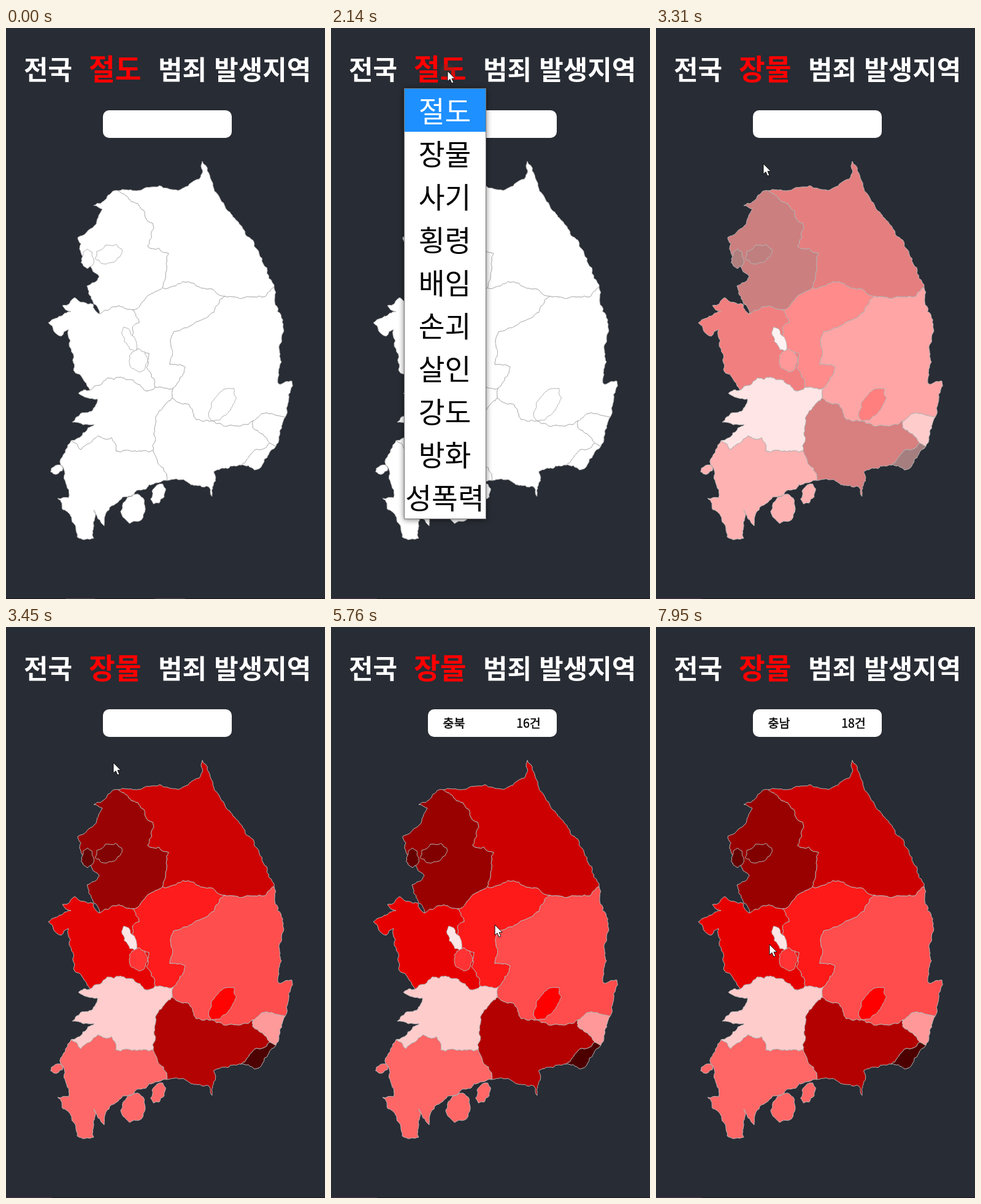
Animation, 520 px wide and 930 px high, one loop 8000 ms. Source, as an HTML page:

```html
<!DOCTYPE html>
<html lang="ko">
<meta charset="utf-8">
<style>
  html, body { margin: 0; height: 100%; overflow: hidden; background: #282c34; }
  svg { display: block; width: 520px; height: 930px; font-family: "Noto Sans CJK KR", "Noto Sans CJK", "Noto Sans CJK JP", sans-serif; }
  .title { font-weight: 700; font-size: 43px; fill: #fff; }
  .info { font-weight: 500; font-size: 19.5px; stroke: #000; stroke-width: .4; }
  #map path { stroke: #b4b4b4; stroke-width: 1; stroke-linejoin: round; }
  #menu { font-size: 46.5px; text-anchor: middle; }
  #frame { filter: drop-shadow(0 1px 5px rgba(0,0,0,.55)); }
</style>
<svg id="stage" viewBox="0 0 520 930">
  <rect width="520" height="930" fill="#282c34"/>
  <rect y="929" width="520" height="1" fill="#1e1622"/>
  <path id="bottomStart" d="M97 929.5H145M243 929.5H292" stroke="#4a4450"/>
  <path id="bottomEnd" d="M0 929.5H75" stroke="#4b3048"/>
  <text class="title" x="29" y="84">전국</text>
  <text class="title" x="135" y="84" id="crime" style="font-size:46.5px;fill:#f00"></text>
  <text class="title" x="248" y="84">범죄 발생지역</text>
  <rect x="158" y="134" width="210" height="45" rx="10" fill="#fff"/>
  <text class="info" id="place" x="182.5" y="164"></text>
  <text class="info" id="count" x="322" y="164" text-anchor="middle"></text>
  <g id="map"></g>
  <g id="menu">
    <rect id="frame" x="119.5" y="98.5" width="133" height="701" fill="#fff" stroke="#767676"/>
    <rect id="highlight" x="120" width="132" height="70" fill="#1e90ff"/>
  </g>
  <circle id="press" r="12" fill="#503c32" opacity=".3"/>
  <path id="cursor" d="M0 0V17L4 13.4 6.7 20 9.8 18.8 7 12.3H12Z" fill="#fff" stroke="#000" stroke-width=".9"/>
</svg>
<script>
const $ = id => document.getElementById(id);
const make = (tag, parent, attrs) => {
  const node = parent.appendChild(document.createElementNS('http://www.w3.org/2000/svg', tag));
  for (const key in attrs) node.setAttribute(key, attrs[key]);
  return node;
};

let seed = 7;
const random = () => (seed = seed * 16807 % 2147483647) / 2147483647 - .5;

// Fractal midpoint displacement turns a few key points into a ragged border
function wiggle([ax, ay], [bx, by]) {
  const dx = bx - ax, dy = by - ay, length = Math.hypot(dx, dy);
  if (length < 5) return [[bx, by]];
  const shift = random() * Math.min(.35, 7 / length);
  const middle = [(ax + bx) / 2 - dy * shift, (ay + by) / 2 + dx * shift];
  return [...wiggle([ax, ay], middle), ...wiggle(middle, [bx, by])];
}
const ragged = points => points.flatMap((p, i) => i ? wiggle(points[i - 1], p) : [p]);
const line = text => ragged(text.split(' ').map(p => p.split(',').map(Number)));
function blob(cx, cy, rx, ry, degrees = 0) {
  const turn = degrees * Math.PI / 180, points = [];
  for (let i = 0; i < 8; i++) {
    const a = i * Math.PI / 4, u = rx * Math.cos(a), v = ry * Math.sin(a);
    points.push([cx + u * Math.cos(turn) - v * Math.sin(turn), cy + u * Math.sin(turn) + v * Math.cos(turn)]);
  }
  return ragged([...points, points[0]]);
}

// Border lines, each shared by the regions on both sides
const borders = {
  gwCoast: line('183,265 290,260 315,246 320,217 350,280 409,360 437,423'),
  gyGw: line('183,265 218,291 239,318 231,356 265,367 255,423'),
  gyCoast: line('183,265 143,289 157,295 144,322 117,341 125,385 152,405 132,420 152,466'),
  gyCn: line('152,466 190,454 206,459'),
  gyCb: line('206,459 231,436 255,423'),
  gwCb: line('255,423 288,413 357,437'),
  gwGb: line('357,437 421,438 437,423'),
  cnCoast: line('152,466 142,450 112,439 92,452 106,462 69,480 90,502 102,491 116,563 137,590'),
  cnCb: line('206,459 217,480 206,487 212,522 233,530 229,553 243,585'),
  cnJb: line('137,590 165,570 208,574 227,591 243,585'),
  cbJb: line('243,585 273,586'),
  cbGb: line('357,437 330,470 273,495 267,548 292,552 273,586'),
  gbJb: line('273,586 271,603'),
  gbCoast: line('437,423 452,483 445,580 466,575 455,634'),
  gbUs: line('455,634 420,628 402,640'),
  gbGn: line('402,640 376,648 310,638 299,614 271,603'),
  jbGn: line('271,603 245,632 240,688'),
  jbJn: line('240,688 179,689 172,667 150,664 122,687 106,672'),
  jbCoast: line('106,672 144,646 108,642 145,617 149,604 118,595 137,590'),
  jnCoast: line('106,672 89,702 102,765 84,766 107,800 116,829 143,831 143,785 160,811 168,785 190,764 262,737'),
  jnGn: line('240,688 262,737'),
  gnCoast: line('262,737 293,738 331,748 336,763 339,722 383,712'),
  gnBs: line('383,712 402,691 430,676'),
  usBs: line('430,676 440,681'),
  usGn: line('402,640 402,650 430,676'),
  usCoast: line('455,634 440,681'),
  bsCoast: line('440,681 418,711 405,720 383,712'),
  seoul: blob(167, 368, 23, 15, -20),
  incheon: blob(133, 376, 10, 16),
  sejong: blob(201, 507, 22, 9, 65),
  daejeon: blob(216, 541, 15, 19),
  daegu: blob(353, 613, 32, 16, -55),
  goheung: blob(208, 783, 19, 25, 15),
  yeosu: blob(248, 759, 11, 18, 25),
  islet: blob(83, 719, 11, 7, -20)
};

const ring = names => 'M' + names.split(' ').flatMap(name =>
  name[0] == '-' ? [...borders[name.slice(1)]].reverse() : borders[name])
  .map(p => p.map(v => v.toFixed(1))).join('L') + 'Z';

// name, cases, lightness of red, border rings
const regions = [
  ['강원', 20, 40, 'gwCoast -gwGb -gwCb -gyGw'],
  ['경기', 139, 30, 'gyCoast gyCn gyCb -gyGw'],
  ['충북', 16, 55, 'gyCb gwCb cbGb -cbJb -cnCb'],
  ['충남', 18, 45, 'cnCoast cnJb -cnCb -gyCn'],
  ['경북', 12, 65, 'gwGb gbCoast gbUs gbGn -gbJb -cbGb'],
  ['전북', 6, 90, 'cnJb cbJb gbJb jbGn jbJn jbCoast'],
  ['전남', 11, 70, 'jnCoast -jnGn jbJn', 'goheung', 'yeosu', 'islet'],
  ['경남', 84, 35, 'jbGn jnGn gnCoast gnBs -usGn gbGn'],
  ['부산', 210, 15, 'bsCoast gnBs usBs'],
  ['울산', 9, 80, 'usCoast -usBs -usGn -gbUs'],
  ['서울', 160, 25, 'seoul'],
  ['인천', 180, 20, 'incheon'],
  ['세종', 2, 95, 'sejong'],
  ['대전', 14, 60, 'daejeon'],
  ['대구', 17, 50, 'daegu']
].map(([name, cases, light, ...rings]) =>
  ({ name, cases, light, path: make('path', $('map'), { d: rings.map(ring).join('') }) }));

const items = ['절도', '장물', '사기', '횡령', '배임', '손괴', '살인', '강도', '방화', '성폭력'].map((label, i) => {
  const node = make('text', $('menu'), { x: 185.5, y: 153 + 70 * i });
  node.textContent = label;
  return node;
});

// Cursor moves: end time, x, y, duration
const moves = [
  [1220, 190, 92, 760], [1410, 190, 70, 140], [2740, 175, 221], [4310, 279, 329], [4930, 238, 381],
  [5560, 267, 485], [6170, 321, 502], [6580, 294, 645, 280], [7130, 162, 639, 360], [7950, 185, 517, 690]
];
const clamp = v => Math.max(0, Math.min(1, v));
function cursorAt(t) {
  const tip = $('stage').createSVGPoint();
  tip.x = 525;
  tip.y = 330;
  for (const [end, x, y, duration = 420] of moves) {
    const u = clamp(1 + (t - end) / duration), eased = u * u * (3 - 2 * u);
    tip.x += (x - tip.x) * eased;
    tip.y += (y - tip.y) * eased;
  }
  return tip;
}
const cubicInOut = u => u < .5 ? 4 * u ** 3 : 1 - 4 * (1 - u) ** 3;
const show = (id, on) => $(id).setAttribute('visibility', on ? 'visible' : 'hidden');

function render(t) {
  const { x, y } = cursorAt(t);
  const chosen = t >= 3170, open = t >= 2070 && !chosen;
  $('crime').textContent = chosen ? '장물' : '절도';

  const fade = chosen ? cubicInOut(clamp((t - 3118) / 385)) : 0;
  for (const { path, light } of regions)
    path.style.fill = `color-mix(in srgb, hsl(0 100% ${light}%) ${fade * 100}%, white)`;

  // The label follows the cursor with a short delay
  const tip = cursorAt(t - 70);
  const hovered = t > 3500 && regions.findLast(r => r.path.isPointInFill(tip));
  $('place').textContent = hovered ? hovered.name : '';
  $('count').textContent = hovered ? hovered.cases + '건' : '';

  show('menu', open);
  $('menu').setAttribute('opacity', t < 2140 ? .6 : 1);
  const active = y > 168 ? 1 : 0;
  $('highlight').setAttribute('y', 99 + 70 * active);
  items.forEach((item, i) => item.setAttribute('fill', i == active ? '#fff' : '#000'));

  show('cursor', t >= 530);
  show('press', t >= 2070 && t < 2400 || t >= 3030 && t < 3170);
  for (const id of ['cursor', 'press']) $(id).setAttribute('transform', `translate(${x} ${y})`);
  show('bottomStart', t < 530);
  show('bottomEnd', t >= 2070);
}

const begin = performance.now();
function tick() {
  render((performance.now() - begin) % 8000);
  requestAnimationFrame(tick);
}
tick();
</script>
</html>
```
